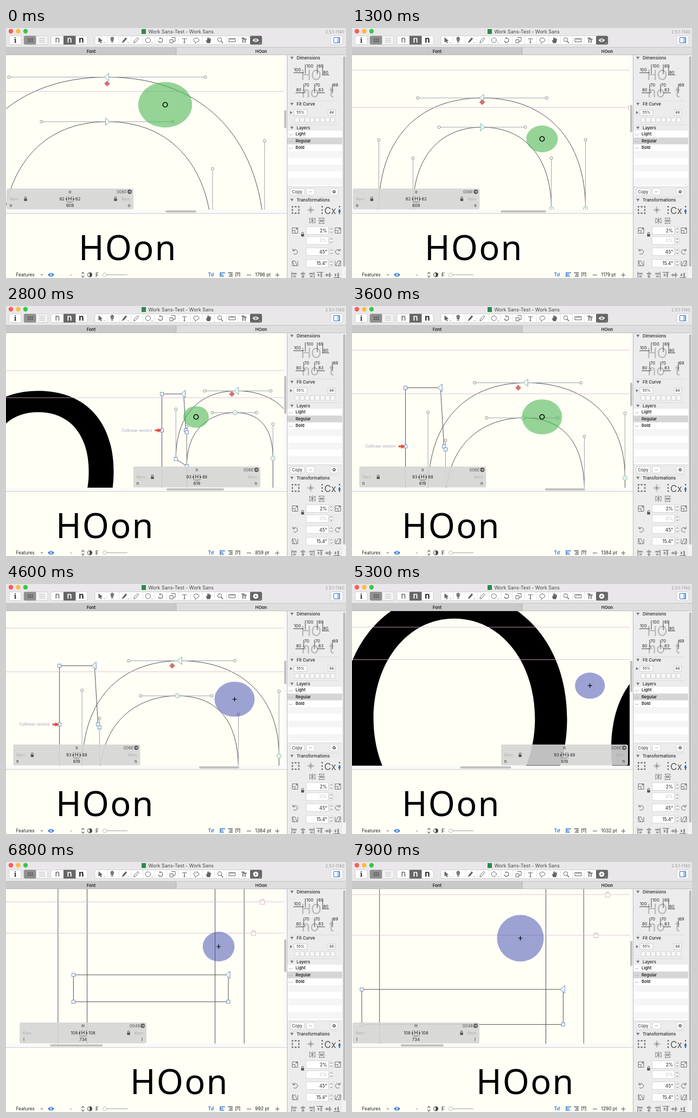
An HTML page for the animation above (8000 ms loop, 627 by 461 pixels).

```html
<!DOCTYPE html>
<html lang="en">
<head>
<meta charset="utf-8">
<title>Glyph editor</title>
<style>
  html, body { margin: 0; width: 100%; height: 100%; overflow: hidden; background: #fffff6; }
  svg { display: block; width: 627px; height: 461px; font-family: Inter, "Liberation Sans", sans-serif; }
  text { fill: #222; white-space: pre; }
  .preview { font-family: "Noto Sans", "Open Sans", sans-serif; letter-spacing: 2.2px; fill: #000; }
</style>
</head>
<body>
<svg id="stage" viewBox="0 0 627 461">
  <defs><clipPath id="view"><rect y="50" width="512" height="285"/></clipPath></defs>
  <g id="chrome"></g>
  <g id="edit" clip-path="url(#view)"></g>
  <g id="live"></g>
</svg>
<script>
const $ = id => document.getElementById(id);
const PAPER = '#fffff6', INK = '#505050', ICON = '#626262', BLUE = '#2f74d0';

// Text is placed by the vertical centre of its capitals.
const text = (x, y, s, size = 8, o = '') =>
  `<text x="${x}" y="${y + size * .36}" font-size="${size}" ${o}>${s}</text>`;
const mid = 'text-anchor="middle" ', end = 'text-anchor="end" ';
const fill = c => `style="fill:${c}" `;
const rect = (x, y, w, h, c, o = '') => `<rect x="${x}" y="${y}" width="${w}" height="${h}" fill="${c}" ${o}/>`;
const circ = (x, y, r, c = 'none', o = '') => `<circle cx="${x}" cy="${y}" r="${r}" fill="${c}" ${o}/>`;
const line = (d, c = ICON, w = 1, f = 'none') => `<path d="${d}" fill="${f}" stroke="${c}" stroke-width="${w}"/>`;
const at = (x, y, s) => `<g transform="translate(${x} ${y})">${s}</g>`;
const stroke = (c, w = 1) => `stroke="${c}" stroke-width="${w}" `;
const button = (x, y, w, h, c = '#fff') => rect(x, y, w, h, c, 'rx="2.5" ' + stroke('#c4c4c4', .7));
const padlock = (x, y, c = '#555') => at(x, y,
  rect(-2.7, -1, 5.4, 4.5, c, 'rx=".6"') + line('M-1.7 -1V-2.5A1.7 1.7 0 0 1 1.7 -2.5V-1', c));
const eye = (x, y, c, pupil) => at(x, y,
  `<path d="M-6 0Q0 -7 6 0Q0 7 -6 0Z" fill="${c}"/>` + circ(0, 0, 2.2, pupil) + circ(0, 0, 1, c));

function toolbar() {
  let s = rect(0, 0, 627, 36, '#e9e7e9') + rect(0, 35, 627, 1, '#c4c4c4');
  ['#fc5b57', '#fdbc40', '#34c84a'].forEach((c, i) => s += circ(9 + i * 13.5, 6, 4.2, c));
  s += rect(250, 2, 8, 9, '#2f8a4a');
  s += text(262.5, 6.5, 'Work Sans-Test - Work Sans', 8.9, fill('#444'));
  s += text(624, 7, '2.5.1-1140', 7.6, end + fill('#999'));
  s += button(6, 14.5, 22, 16) + text(17, 22.5, 'i', 12, mid + 'font-weight="700" font-family="Noto Serif, serif"');
  s += button(33, 14.5, 44, 16, '#f4f4f4') + rect(33, 14.5, 22.5, 16, '#909090', 'rx="2.5"');
  for (let i = 0; i < 6; i++) s += rect(40 + i % 3 * 3.6, 19 + (i / 3 | 0) * 4, 2.6, 3, '#666');
  s += line('M61 19H72M61 22.5H72M61 26H72', '#b8b8b8');
  s += button(83, 14.5, 67, 16) + rect(106, 14.5, 22.5, 16, '#666');
  s += text(95, 21.5, 'n', 15, mid + 'font-weight="300"');
  s += text(117, 21.5, 'n', 15, mid + 'font-weight="600" ' + fill('#fff'));
  s += text(139, 21.5, 'n', 15, mid + 'font-weight="700"');

  s += button(164, 14.5, 308, 16);
  for (let i = 1; i < 14; i++) s += rect(164 + i * 22, 15, .7, 15, '#d8d8d8');
  const icons = [
    line('M-3 -5V4L-.6 2L1 5.5L2.5 4.8L1 1.5L4 1Z', ICON, .4, ICON),
    line('M0 -6V0M-3 -4L0 -6L3 -4L1.5 2H-1.5ZM-2 4H2', ICON, 1, '#888'),
    line('M-4 5L-2 1L3 -5L5 -3L0 3Z', ICON, .5, ICON),
    line('M-4 5L-3 1L3 -5L5 -3L-1 4Z'),
    circ(0, 0, 4.5, 'none', stroke(ICON)),
    line('M-4 1A4 4 0 1 0 0 -4L-2 -5M0 -4L-2 -2', ICON, 1.2),
    line('M-5 -1H1V5H-5ZM-2 -5H5V2H1'),
    text(0, .5, 'T', 13, mid + 'font-weight="500" font-family="Noto Serif, serif"' + fill(ICON)),
    line('M-5 -1A5 3.6 0 1 1 1 3L-2 6L-2 3Q-5 2 -5 -1Z'),
    line('M-4 0L-2 5H3L5 -2L3 -1V-4L1 -1V-5L-1 -1V-5L-2 1Z', ICON, .8, ICON),
    circ(-1, -1, 3.7, 'none', stroke(ICON)) + line('M2 2L5 5.5', ICON, 1.5),
    line('M-6 -3H6V3H-6ZM-3 -3V0M0 -3V0M3 -3V0'),
    line('M-5 -4H1M-2 -4V5M-1 -2H5M2 -2V5', ICON, 1.6)
  ];
  icons.forEach((icon, i) => s += at((i < 5 ? 173.8 : 175) + i * 22, 22.5, icon));
  [0, 2, 4].forEach(i => s += line(`M${180 + i * 22} 26.5l1.5 1.5l1.5 -1.5`, '#777', .8));
  s += rect(450, 14.5, 22, 16, '#666', 'rx="2.5"');
  s += button(599, 14.5, 22, 16) + line('M604.5 17.5H615.5V27.5H604.5Z', BLUE) + rect(611, 18, 4, 9, '#9cc2f0');

  s += rect(0, 36, 314, 14, '#c9c9c9') + rect(314, 36, 313, 14, '#dedede') + rect(313.5, 36, .8, 14, '#aaa');
  s += rect(0, 49.3, 627, .7, '#b5b5b5');
  const bold = mid + 'font-weight="600"';
  return s + text(157, 43.5, 'Font', 7.8, bold) + text(470.5, 43.5, 'HOon', 7.8, bold);
}

function field(y, label, c = '#222') {
  const step = line(`M598 ${y - 1.7}l1.8 -2.5l1.8 2.5M598 ${y + 1.7}l1.8 2.5l1.8 -2.5`, '#555', .9);
  return rect(553.5, y - 7, 41, 14, '#fff', stroke('#ccc', .7)) + text(592, y, label, 8.4, end + fill(c)) +
    button(596.5, y - 6.5, 6.5, 13) + step;
}

function sidebar() {
  let s = rect(518, 50, 109, 411, '#ececec') + rect(518, 50, 1, 411, '#bbb');
  const heads = [[55, 'Dimensions'], [140, 'Fit Curve'], [184, 'Layers'], [317, 'Transformations']];
  for (const [y, t] of heads)
    s += line(`M524.5 ${y - 2}h5.5l-2.75 4.5z`, '#777', .3, '#777') + text(536, y, t, 7.8, 'font-weight="500"');
  [134, 178, 311].forEach(y => s += rect(523, y, 90, .7, '#d4d4d4'));

  s += text(544, 87, 'HO', 25, fill('#b8b8b8')) + text(545, 118, 'no', 27, fill('#b8b8b8'));
  s += text(596, 118, 't', 27, fill('#b8b8b8'));
  s += line('M530 82.5H549M552 67V84M574 67V85M583 86.5H596M584 72V87M534 119.5H551M549 103V115L553 119' +
    'M569 103V120M574 119.5H588M602 103V120', '#333', .9);
  const dims = [[554, 70, 100], [576, 70, 69], [531, 77.5, 100], [585, 82, 80], [550, 105, 70],
    [570, 105, 70], [603, 105, 69], [535, 114.5, 80], [576, 114.5, 83]];
  for (const [x, y, n] of dims) s += text(x, y, n, 7.6);

  s += line('M524 153.5v5l4 -2.5z', '#777', .3, '#777');
  s += rect(531, 151, 24, 10, '#fff', stroke('#bbb', .7)) + rect(594, 151, 13.5, 10, '#fff', stroke('#bbb', .7));
  s += text(543, 156, '55%', 6.8, mid) + text(600.7, 156, '66', 6.8, mid);
  for (let i = 0; i < 8; i++) s += button(532.5 + i * 9.4, 165, 8.4, 9, '#f8f8f8');

  s += rect(519, 189.5, 101, 103, '#fff');
  for (let i = 0; i < 8; i += 2) s += rect(519, 202 + i * 12.5, 101, 12.5, i ? '#f5f5f5' : '#d6d6d6');
  ['Light', 'Regular', 'Bold'].forEach((t, i) => {
    const y = 195.5 + i * 12.5;
    s += line(`M521 ${y}q4 4 8 0`, '#b8b8b8') + text(534, y, t, 7.6, 'font-weight="600"');
  });
  s += rect(519, 292.5, 101, .7, '#ccc');
  s += rect(620, 50, 7, 411, '#f4f4f4') + rect(621.5, 52, 4.5, 388, '#bdbdbd', 'rx="2.2"');
  s += button(524, 296, 26, 12) + text(537, 302, 'Copy', 7.6, mid);
  s += button(554, 296, 15, 12) + line('M558.5 302h6', '#aaa');
  s += button(598, 296, 14, 12) + circ(605, 302, 2.2, 'none', stroke('#444', 1.4) + 'stroke-dasharray="1.2 .5"') +
    circ(605, 302, 2, 'none', stroke('#444', 1));

  s += at(534, 335.5, line('M-6 -6H6V6H-6Z', '#999', .7));
  for (let i = 0; i < 9; i++) if (i !== 4) s += rect(527 + i % 3 * 6, 328.5 + (i / 3 | 0) * 6, 2.2, 2.2, '#555');
  s += circ(562, 335.5, 3.5, 'none', stroke('#999', .8)) + line('M555 335.5h14M562 328.5v14', '#888', .7) + circ(562, 335.5, 1.2, '#555');
  s += text(587, 336.5, 'Cx', 17, fill('#555'));
  [329.5, 335.5, 341.5].forEach(y => s += circ(583, y, 1.2, '#444') + circ(615, y, 1.2, '#444'));
  s += circ(615, 338, 2.2, BLUE);
  s += line('M560 350.5V360L564 357V353ZM570 350.5V360L566 357V353ZM565 349V361.5', '#666', .8);
  s += line('M577 350.5H587L585 354H579ZM577 360.5H587L585 357H579ZM575.5 355.5H588.5', '#666', .8);
  const scale = line('M-5 -5H5V5H-5ZM-5 0H0V5M1 -1L4 -4M2 -4H4V-2', '#666', .9);
  s += at(533, 373.5, scale) + at(612, 373.5, scale) + padlock(547, 381);
  s += field(373.5, '2%') + field(392, '0%', '#c4c4c4') + field(412.5, '45°') + field(434, '15.4°');
  const turn = line('M-3.5 -2A4.3 4.3 0 1 1 -3 3.2M-4 -5.5V-1.7H0', '#666');
  s += at(533, 412.5, turn) + at(612, 412.5, `<g transform="scale(-1 1)">${turn}</g>`);
  const slant = line('M-5 -4.5H0L4 4.5H-1ZM-5 -4.5V4.5H-1M5 -4.5V4.5', '#666', .9);
  s += at(533, 434, slant) + at(612, 434, `<g transform="scale(-1 1)">${slant}</g>`);
  for (let i = 0; i < 6; i++) {
    const k = i % 3 * 5 - 5;
    const bars = line(`M${k} -6V6`, '#666') + rect(-4, -4, 8, 3, '#999') + rect(-2.5, 1, 5, 3, '#999');
    s += at(532 + i * 15.6, 455.5, `<g transform="rotate(${i > 2 ? 90 : 0})">${bars}</g>`);
  }
  return s;
}

function footer() {
  let s = rect(0, 334.5, 518, 7, '#fafafa') + rect(512, 50, 6, 285, '#fafafa');
  s += rect(0, 341.5, 518, 1, '#c6c6cc');
  s += text(18.5, 455, 'Features', 8.4) + line('M64 454l2 2.2l2 -2.2', '#555') + eye(83, 455, BLUE, '#fff');
  s += text(119.5, 455, '-', 8, mid) + line('M139.5 453.5l2.3 -3l2.3 3M139.5 456.5l2.3 3l2.3 -3', '#444', 1.1);
  s += circ(154.5, 455, 4, 'none', stroke('#444')) + line('M154.5 451A4 4 0 0 1 154.5 459Z', '#444', .5, '#444');
  s += text(165, 455, 'F', 10, 'font-weight="600"' + fill('#555'));
  s += line('M185 455H224', '#bbb', 1.5) + circ(182, 455, 3.5, '#fff', stroke('#aaa', .8));
  s += text(372.5, 455, 'To', 9, 'font-weight="600"' + fill(BLUE)) + circ(382.5, 452.5, 1, BLUE);
  s += line('M394.5 451.5H404M394.5 454.5H400M394.5 457.5H402M395 450.5V459', BLUE, 1.3);
  s += line('M409.5 451.5H418M412.5 454.5H418M411 457.5H418', '#555', 1.3);
  s += line('M424 451V459M427.5 451V457M431 451V459M423 451.5H432', '#555', 1.2);
  return s + line('M444 455.5H452M496.5 455.5H504M500.3 451.5V459.5', '#555');
}

const oval = (l, r, b, t, hx, hy) => {
  const m = (l + r) / 2, c = (t + b) / 2;
  return `M${m} ${t}C${m + hx} ${t} ${r} ${c + hy} ${r} ${c}S${m + hx} ${b} ${m} ${b}` +
    `S${l} ${c - hy} ${l} ${c}S${m - hx} ${t} ${m} ${t}Z`;
};
const box = (l, r, b, t) => `M${l} ${b}V${t}H${r}V${b}Z`;

// Outlines in font units, y up.
const glyphs = {
  H: { x: 0, rule: 'nonzero', d: box(108, 189, 0, 660) + box(545, 626, 0, 660) + box(151, 582, 297, 372) },
  O: { x: 734, rule: 'evenodd', d: oval(56, 660, -10, 670, 178, 198) + oval(142, 574, 62, 598, 126, 150) },
  o: { x: 1450, rule: 'evenodd', d: oval(62, 546, -10, 510, 151, 162) + oval(142, 466, 58.5, 441.5, 101, 119) },
  n: { x: 2058, rule: 'nonzero', d: 'M93 0V500H163L170 383L173 378V0Z' +
    'M138 291C138 451 231 510 334 510C443 510 531 449 531 320V0H450V293C450 403 397 440 328 440C255 440 173 395 173 268Z' }
};
const info = {
  o: { code: '006F', l: 62, r: 62, adv: 608, group: 'o', locks: [35, 201], textX: 133.9 },
  n: { code: '006E', l: 93, r: 88, adv: 619, group: 'n', locks: [35], textX: 91.9 },
  H: { code: '0048', l: 108, r: 108, adv: 734, group: 'I', locks: [201], textX: 228.9 }
};

// time, pt, view centre x y, pointer x y, brush rx ry (units), scrollbar x w
const keys = [
  [0, 1796, 1811.5, 426.7, 293, 141, 41.4, 35, 294, 57],
  [1300, 1179, 1773.6, 431.9, 350, 204, 37, 31.4, 274, 84],
  [2000, 859, 1886.4, 415.9, 350, 204, 41, 35, 271, 105],
  [2800, 859, 2095.3, 450.7, 350, 204, 41, 35, 296, 106],
  [3600, 1384, 2320.8, 457, 350, 204, 40, 35, 356, 74],
  [4500, 1384, 2320.8, 457, 421, 212, 40, 35, 356, 74],
  [4600, 1384, 2320.8, 457, 421, 212, 40, 35, 356, 74],
  [5900, 817, 291.3, 379.9, 452, 167, 40, 35, 75, 110],
  [7900, 1290, 426.6, 423.6, 310, 140, 50, 50, 90, 79]
];

function pose(t) {
  const i = Math.max(0, keys.findLastIndex(k => k[0] <= t));
  const a = keys[i], b = keys[i + 1] || a;
  let u = b === a ? 0 : (t - a[0]) / (b[0] - a[0]);
  u = u * u * (3 - 2 * u);
  return a.map((v, j) => j === 1 ? v * (b[1] / v) ** u : v + (b[j] - v) * u);
}

function marks(name, P) {
  const TEAL = '#7fb0b0', NODE = '#6f8cc8';
  const handle = (ax, ay, bx, by) => {
    const [x, y] = P(bx, by);
    return line(`M${P(ax, ay)}L${x} ${y}`, '#a2a2ac') + circ(x, y, 2.5, PAPER, stroke('#808080', .9));
  };
  const square = (ux, uy) => { const [x, y] = P(ux, uy); return rect(x - 3, y - 3, 6, 6, PAPER, stroke(NODE)); };
  const dot = (ux, uy) => { const [x, y] = P(ux, uy); return circ(x, y, 4, PAPER, stroke(TEAL)) + circ(x, y, 1, TEAL); };
  const arrow = (ux, uy, k, c = TEAL) => {
    const [x, y] = P(ux, uy);
    return line(`M${x + 3 * k} ${y - 7}L${x - 5 * k} ${y}L${x + 3 * k} ${y + 7}Z`, c, 1, '#f2f8f4');
  };
  const anchor = (ux, uy) => { const [x, y] = P(ux, uy); return line(`M${x} ${y - 5}l5 5l-5 5l-5 -5z`, '#b86a6a', .6, '#cf7474'); };

  if (name === 'o') {
    const side = k => handle(304 + 242 * k, 250, 304 + 242 * k, 412) + handle(304 + 162 * k, 250, 304 + 162 * k, 369) +
      handle(304, 510, 304 + 151 * k, 510) + handle(304, 441.5, 304 + 101 * k, 441.5) +
      dot(304 + 242 * k, 250) + dot(304 + 162 * k, 250);
    return side(-1) + side(1) + arrow(304, 510, 1) + arrow(304, 441.5, -1) + anchor(304, 500);
  }
  if (name === 'n') {
    const [x, y] = P(93, 383);
    return handle(138, 291, 138, 451) + handle(334, 510, 231, 510) + handle(334, 510, 443, 510) +
      handle(531, 320, 531, 449) + handle(328, 440, 255, 440) + handle(328, 440, 397, 440) +
      handle(450, 293, 450, 403) + handle(173, 268, 173, 395) +
      square(93, 500) + square(93, 383) + square(170, 383) + square(173, 377) + square(138, 291) + square(173, 268) +
      arrow(163, 500, 1, NODE) + arrow(334, 510, 1) + dot(328, 440) + dot(450, 293) + dot(531, 320) + anchor(318, 500) +
      text(x - 18, y, 'Collinear vectors', 7, end + fill('#a09cc0')) +
      `<path d="M${x - 13} ${y - 1.5}h5v-2.5l8 4l-8 4v-2.5h-5z" fill="#e8483f"/>`;
  }
  return square(151, 372) + square(151, 297) + square(582, 297) + arrow(582, 372, 1, NODE);
}

function panel(name, left) {
  const g = info[name], x = Math.min(275, Math.max(1, left + .8));
  const grey = fill('#aaa');
  let s = rect(0, 296, 234, 38.5, '#d5d5d5', 'rx="3" opacity=".9"');
  s += text(117, 302.5, name, 7.4, mid) + text(222, 302, g.code, 7.6, end + fill('#555'));
  s += circ(227, 302, 4, '#555') + line('M224.5 302h4.5M227.2 300l2 2l-2 2', '#eee', .9);
  s += text(6, 315.5, 'Kern', 7.2, grey) + text(228, 315.5, 'Kern', 7.2, end + grey);
  g.locks.forEach(lx => s += padlock(lx, 315.5));
  s += text(107, 315.5, g.l, 7.6, end) + text(127, 315.5, g.r, 7.6);
  s += text(117, 315, 'H', 9.5, mid) + line('M111 310.5V320.5M123 310.5V320.5M112.5 321H121.5', '#444', .8);
  s += line('M109.5 314v3l2 -1.5zM124.5 314v3l-2 -1.5z', '#222', .3, '#222');
  s += text(8, 327.5, g.group, 7.6, mid) + text(117, 327.5, g.adv, 7.6, mid) + text(226, 327.5, g.group, 7.6, mid);
  return at(x, 0, s);
}

function draw(t) {
  const [, pt, cx, cy, mx, my, rx, ry, hx, hw] = pose(t);
  const s = pt * 6.68e-4, ox = 255.5 - cx * s, base = 190.5 + cy * s;
  const name = t < 2400 ? 'o' : t < 6700 ? 'n' : 'H';
  const gx = ox + glyphs[name].x * s;
  const P = (x, y) => [gx + x * s, base - y * s];
  const adding = t >= 4000;
  const px = mx + .5, py = my + .5;

  let out = rect(0, 50, 512, 285, PAPER);
  for (const key in glyphs) {
    const g = glyphs[key];
    const look = key === name ? `fill="none" stroke="${INK}" vector-effect="non-scaling-stroke"` : `fill-rule="${g.rule}"`;
    out += `<path transform="translate(${ox + g.x * s} ${base}) scale(${s} ${-s})" d="${g.d}" ${look}/>`;
  }
  for (const [x, y] of [[677, 575], [652, 488]]) {
    const [lx, ly] = P(x, y);
    out += line(`M0 ${ly}H512`, '#d8b4d2', .8);
    out += at(lx, ly, rect(-4, -2.5, 8, 7, PAPER, stroke('#dcb4cc')) + line('M-2.3 -2.5V-4.5H2.3V-2.5', '#dcb4cc'));
  }
  out += marks(name, P);
  out += `<ellipse cx="${px}" cy="${py}" rx="${rx * s}" ry="${ry * s}" fill="${adding ? '#4450b4' : '#4fb858'}" opacity="${adding ? .53 : .6}"/>`;
  out += adding ? line(`M${px - 4} ${py}h8M${px} ${py - 4}v8`, '#000', 1.2) : circ(px, py, 4.2, 'none', stroke('#000', 1.6));
  $('edit').innerHTML = out + panel(name, gx);

  const bar = 'rx="2"', vh = 40 / s, vy = 168 + (427 - cy) * .17;
  $('live').innerHTML = rect(hx, 336.2, hw, 4, '#c1c1c1', bar) + rect(513, vy - vh / 2, 4, vh, '#c1c1c1', bar) +
    `<text class="preview" x="${info[name].textX}" y="428.3" font-size="63">HOon</text>` +
    text(459.5, 455, Math.round(pt) + ' pt', 8.4) +
    (adding ? circ(460.5, 22.5, 4.8, '#fff') + line('M458.5 22.5h4M460.5 20.5v4', ICON) : eye(460.5, 22.5, '#fff', ICON)) +
    line('M467 27l1.5 1.5l1.5 -1.5', '#ddd', .7);
}

$('chrome').innerHTML = rect(0, 0, 627, 461, PAPER) + toolbar() + sidebar() + footer();
const start = performance.now();
let shown = -1;
function tick() {
  const t = Math.floor((performance.now() - start) % 8000 / 100) * 100;
  if (t !== shown) draw(shown = t);
  requestAnimationFrame(tick);
}
tick();
</script>
</body>
</html>
```
